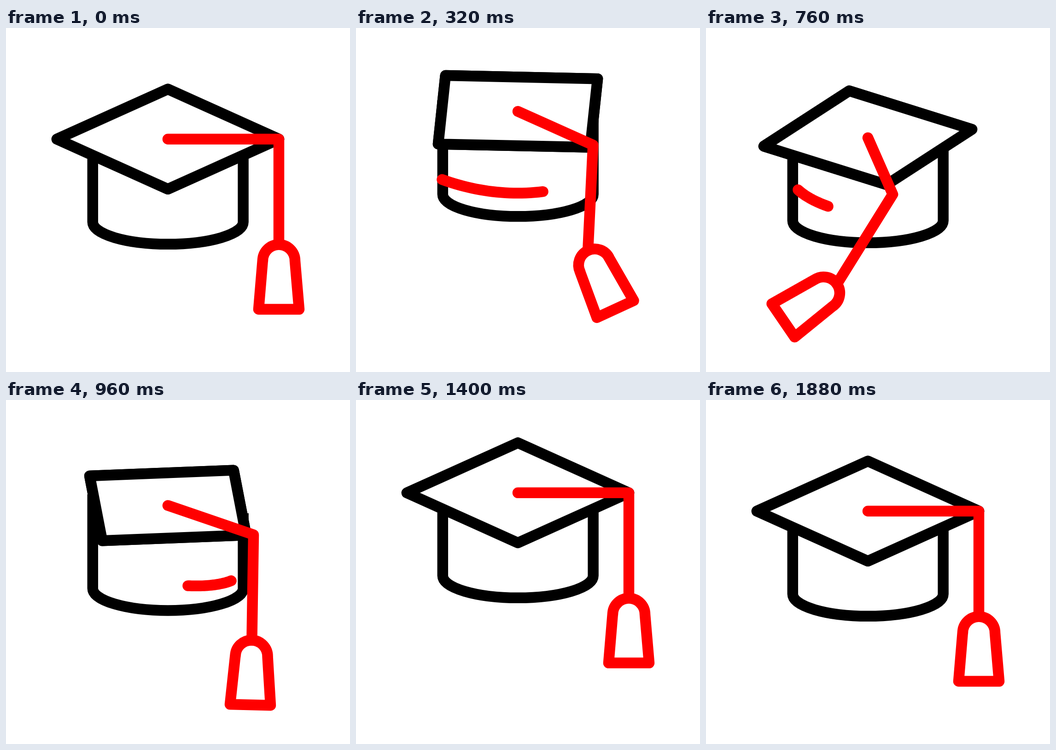
These frames come from a looping animation (747 px wide and 750 px high, 2 s). An HTML page with a canvas:

```html
<!DOCTYPE html>
<html>
<head>
<meta charset="utf-8">
<style>
html, body { margin: 0; width: 100%; height: 100%; overflow: hidden; background: #fff; }
canvas { display: block; }
</style>
</head>
<body>
<canvas id="stage" width="747" height="750"></canvas>
<script>
const ctx = document.getElementById('stage').getContext('2d');
const RX = 241, RY = 109, CX = 351.5, CY = 242.3;
const TURN_BACK = 616, TURN_END = 1212;
const RAD = Math.PI / 180;

const clamp = (x, lo, hi) => Math.max(lo, Math.min(hi, x));
const progress = (t, from, to) => clamp((t - from) / (to - from), 0, 1);
const ease = (t, from, to) => (1 - Math.cos(Math.PI * progress(t, from, to))) / 2;
// Rises from 0 to 1 at the peak and falls back to 0
const bump = (t, from, peak, to) => ease(t, from, peak) - ease(t, peak, to);

const lift = t => -61 * bump(t, 0, 340, 830) - 44 * bump(t, 770, 1305, 1790);

// A quarter turn out, then back with a soft landing
const turn = t => t < TURN_BACK
  ? 90 * ease(t, 0, TURN_BACK)
  : 90 * (1 - progress(t, TURN_BACK, TURN_END) ** 2) ** 2;

const swing = t => 36.5 * bump(t, 240, 690, 990) - 5 * bump(t, 960, 1070, 1190);
const tilt = t => -37 * bump(t, 0, 240, 460) + 73 * bump(t, 290, 650, 990)
  - 25 * bump(t, 960, 1085, 1260);

// Front of the cap: a shallow bow for the way out, a tilted one for the way back
const side = x => (x - 351) / 165;
const bow = x => 420.5 - 30 * side(x) ** 2;
const tiltedBow = x => 354 + 59 * Math.sqrt(1 - side(x) ** 2) + 24 * side(x);

function line(points, close) {
  ctx.beginPath();
  points.forEach(p => ctx.lineTo(...p));
  if (close) ctx.closePath();
  ctx.stroke();
}

function streak(from, to, arc) {
  from = clamp(from, 187, 515);
  to = clamp(to, 187, 515);
  if (to - from < 1) return;
  line(Array.from({ length: 25 }, (_, i) => {
    const x = from + (to - from) * i / 24;
    return [x, arc(x)];
  }));
}

function corner(deg, scale) {
  return [CX + RX * scale * Math.cos(deg * RAD), CY + RY * scale * Math.sin(deg * RAD)];
}

function drawCap() {
  ctx.lineCap = 'butt';
  ctx.beginPath();
  ctx.moveTo(188.3, 218);
  ctx.lineTo(188.3, 423);
  ctx.ellipse(351.7, 423, 163.4, 48.3, 0, Math.PI, 0, true);
  ctx.lineTo(515.1, 259);
  ctx.stroke();
}

function drawTassel(end, swingAngle, tiltAngle) {
  const knot = [end[0] - 230 * Math.sin(swingAngle), end[1] + 230 * Math.cos(swingAngle)];
  line([[CX, CY], end, knot]);
  ctx.translate(...knot);
  ctx.rotate(tiltAngle);
  ctx.beginPath();
  ctx.moveTo(-44, 141);
  ctx.lineTo(-35, 33);
  ctx.arc(0, 35, 35, Math.PI, 0);
  ctx.lineTo(44, 141);
  ctx.closePath();
  ctx.stroke();
}

function draw(t) {
  ctx.setTransform(1, 0, 0, 1, 0, 0);
  ctx.fillStyle = '#fff';
  ctx.fillRect(0, 0, 747, 750);
  ctx.translate(0, lift(t));
  ctx.lineWidth = 23.5;
  ctx.lineJoin = 'round';
  ctx.strokeStyle = '#000';
  drawCap();

  // The board and cord draw in at mid-turn; the cord hangs over the front edge
  const returning = t >= TURN_BACK;
  const [boardDip, cordDip] = returning ? [.08, .033] : [.03, .05];
  const angle = turn(t);
  const mid = Math.max(0, Math.sin(2 * angle * RAD));
  const boardSize = 1 - boardDip * Math.sqrt(mid);
  const cordSize = 1 - cordDip * mid + .2 * Math.sin(angle * RAD) ** 12;

  line([0, 90, 180, 270].map(d => corner(d + angle, boardSize)), true);
  ctx.fill();
  ctx.stroke();

  ctx.strokeStyle = '#f00';
  ctx.lineCap = 'round';
  if (returning) streak(200 + .975 * (t - 760), 265 + 1.12 * (t - 760), tiltedBow);
  else streak(516 - 1.65 * (t - 120), 516 - 1.1 * (t - 220), bow);
  drawTassel(corner(angle - 2.9 * mid, cordSize), swing(t) * RAD, tilt(t) * RAD);
}

// The picture advances in steps of 40 ms and rests at the end of the loop
function tick() {
  const t = performance.now() % 2000;
  draw(Math.min(1880, Math.floor(t / 40) * 40));
  requestAnimationFrame(tick);
}
tick();
</script>
</body>
</html>
```
